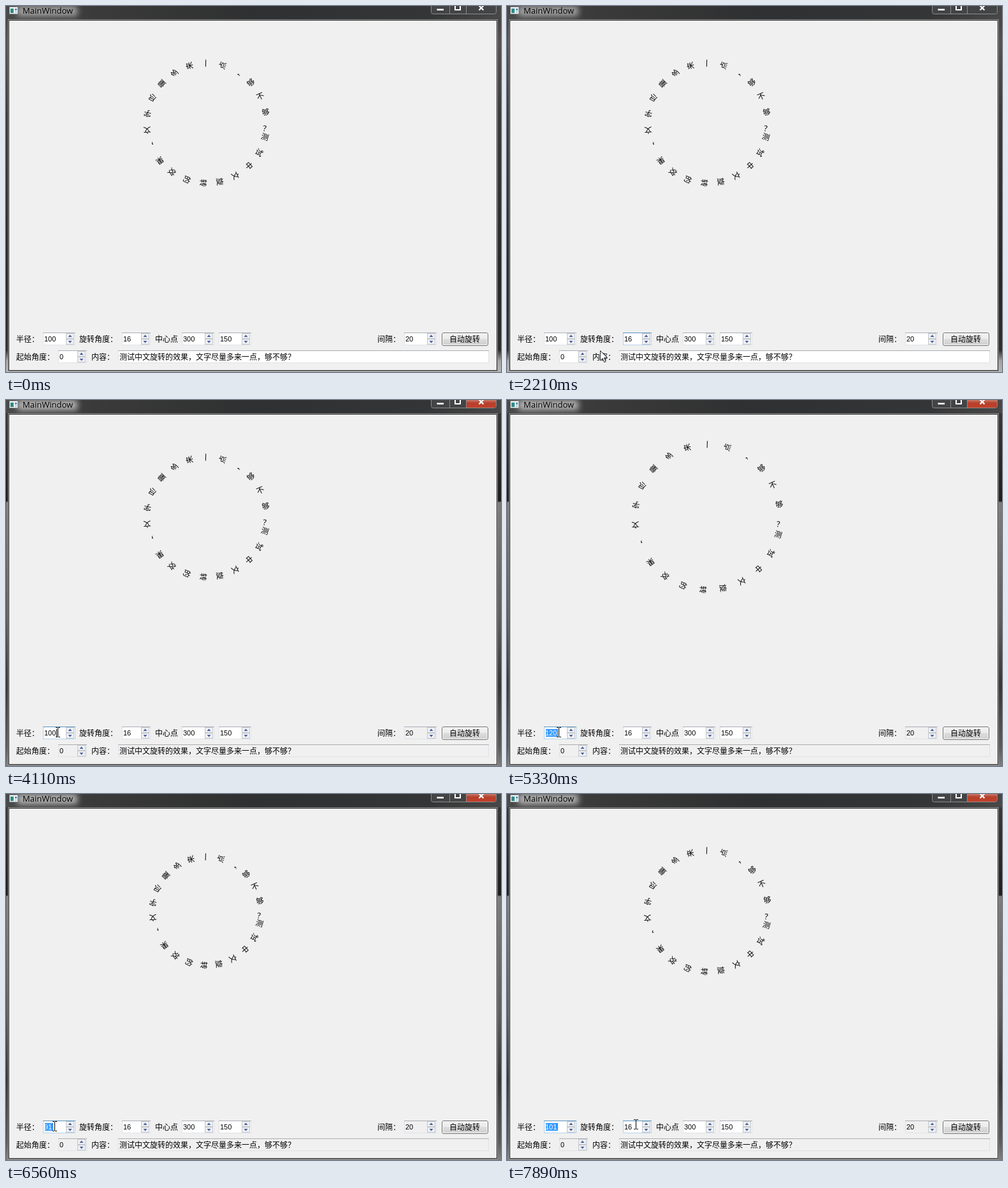
An HTML page for the animation above (8 s loop, 777 px wide and 575 px high).

```html
<!DOCTYPE html>
<html lang="zh-CN">
<head>
<meta charset="utf-8">
<title>MainWindow</title>
<style>
  html, body { margin: 0; width: 100%; height: 100%; overflow: hidden; background: #333; }
  svg { display: block; position: absolute; left: 0; top: 0; }
  text { font: 12px "Noto Sans CJK SC", "Noto Sans CJK", sans-serif; white-space: pre; }
  .num { font: 11px "Liberation Sans", Arial, sans-serif; }
  .title { font: 13px "Open Sans", sans-serif; }
  #ring text { font-weight: 300; }
  rect, line, .crisp { shape-rendering: crispEdges; }
  .soft { shape-rendering: auto; }
</style>
</head>
<body>
<svg id="stage" width="777" height="575" viewBox="0 0 777 575">
  <defs>
    <linearGradient id="bar" x2="1" y2="0">
      <stop offset="0" stop-color="#4a4a4a"/><stop offset=".18" stop-color="#3a3a3a"/>
      <stop offset=".5" stop-color="#2f3031"/><stop offset=".85" stop-color="#343536"/>
      <stop offset="1" stop-color="#484848"/>
    </linearGradient>
    <linearGradient id="sideIdle" x2="0" y2="1">
      <stop offset="0" stop-color="#3c3c3c"/><stop offset=".1" stop-color="#565050"/>
      <stop offset=".3" stop-color="#383838"/><stop offset=".75" stop-color="#242424"/>
      <stop offset=".94" stop-color="#2c2c2c"/><stop offset=".97" stop-color="#a4a4a4"/>
      <stop offset="1" stop-color="#b4b4b4"/>
    </linearGradient>
    <linearGradient id="sideActive" x2="0" y2="1">
      <stop offset="0" stop-color="#3a3a3a"/><stop offset=".276" stop-color="#1c1c1c"/>
      <stop offset=".28" stop-color="#7c7c7c"/><stop offset=".6" stop-color="#5c5c5c"/>
      <stop offset=".78" stop-color="#343434"/><stop offset=".95" stop-color="#5a5a5a"/>
      <stop offset="1" stop-color="#808080"/>
    </linearGradient>
    <linearGradient id="red" x2="0" y2="1">
      <stop offset="0" stop-color="#c8796c"/><stop offset=".4" stop-color="#b5402b"/>
      <stop offset="1" stop-color="#c4402a"/>
    </linearGradient>
    <linearGradient id="push" x2="0" y2="1">
      <stop offset="0" stop-color="#f2f2f2"/><stop offset=".5" stop-color="#ebebeb"/>
      <stop offset=".5" stop-color="#dddddd"/><stop offset="1" stop-color="#cfcfcf"/>
    </linearGradient>
    <filter id="blur" x="-30%" y="-100%" width="160%" height="300%"><feGaussianBlur stdDeviation="5"/></filter>
  </defs>
  <g id="frame"></g>
  <g id="form"></g>
  <g id="ring"></g>
  <g id="pointer"></g>
</svg>
<script>
const LOOP = 8000;
const MESSAGE = "测试中文旋转的效果，文字尽量多来一点，够不够？";
const CENTER = [315, 184], STEP = 16, GLYPH = 12;
const ACTIVE_AT = 4110, SELECT_AT = 4510;

// [time, radius]
const RADII = [[0, 100], [4510, 105], [4660, 108], [4780, 111], [5060, 116], [5330, 120],
  [5610, 118], [5730, 114], [6010, 106], [6160, 102], [6280, 98], [6560, 91],
  [6680, 90], [6980, 96], [7230, 98], [7350, 100], [7470, 101]];

// [time, shape, x, y]
const POINTER = [[0, "none", 0, 0], [1090, "arrow", 574, 538], [1240, "arrow", 542, 518],
  [1390, "arrow", 509, 463], [1540, "arrow", 494, 449], [1690, "arrow", 440, 448],
  [1970, "arrow", 330, 490], [2090, "arrow", 200, 527], [2210, "arrow", 146, 541],
  [2330, "arrow", 118, 546], [2450, "arrow", 114, 535], [2600, "arrow", 80, 520],
  [2750, "beam", 80, 523], [2900, "beam", 81, 522], [5610, "beam", 79, 522],
  [5730, "beam", 76, 522], [7620, "arrow", 112, 518], [7740, "arrow", 168, 518],
  [7890, "beam", 202, 519]];

// [time, highlighted spin box]
const HOVER = [[0, ""], [2090, "angle"], [2330, "start"], [2600, ""], [2750, "radius"], [7890, "radius angle"]];

const $ = id => document.getElementById(id);
const at = (table, t) => table.reduce((found, row) => row[0] <= t ? row : found);

function add(parent, tag, attrs, content) {
  const node = document.createElementNS("http://www.w3.org/2000/svg", tag);
  for (const key in attrs) node.setAttribute(key, attrs[key]);
  if (content !== undefined) node.textContent = content;
  parent.appendChild(node);
  return node;
}
const box = (parent, x, y, width, height, fill, more) =>
  add(parent, "rect", { x, y, width, height, fill, ...more });
const border = (parent, x, y, w, h, stroke, fill = "none", more) =>
  box(parent, x + .5, y + .5, w - 1, h - 1, fill, { stroke, ...more });
const label = (parent, x, y, words, cls = "", fill = "#000") =>
  add(parent, "text", { x, y, class: cls, fill }, words);

// Window frame
const frame = $("frame");
const sides = box(frame, 0, 0, 777, 575, "url(#sideIdle)");
box(frame, 0, 0, 777, 21, "url(#bar)");
const glow = box(frame, 18, 0, 94, 16, "#fff", { class: "soft", filter: "url(#blur)", opacity: .5 });
border(frame, 3, 21, 769, 553, "#9a9a9a");
border(frame, 4, 22, 767, 551, "#2a2a2a", "#f0f0f0");
border(frame, 5, 1, 14, 12, "#8a9298", "#f4f6f6");
box(frame, 7, 4, 5, 7, "#2f8d86");
box(frame, 14, 4, 3, 3, "#5a8fc0");
box(frame, 14, 8, 3, 3, "#c4cdd2");
label(frame, 26, 12, "MainWindow", "title");

const cap = (x, w, fill) => add(frame, "path", {
  d: `M${x + .5} -1V9.5q0 3 3 3h${w - 7}q3 0 3-3V-1`, fill, stroke: "#8c8c8c"
});
cap(667, 103, "#434445");
const closeFill = add(frame, "path", { d: "M723 0h46v9q0 3-3 3h-43z", fill: "url(#red)" });
[696, 722].forEach(x => box(frame, x, 0, 1, 12, "#8c8c8c"));
box(frame, 676, 4, 11, 3, "#fff", { stroke: "#444", "stroke-width": .5 });
add(frame, "path", { d: "M705 -1h8v7h-8z", fill: "none", stroke: "#fff", "stroke-width": 2, class: "crisp" });
add(frame, "path", { d: "M742.5 -.5l7 7m0-7l-7 7", stroke: "#fff", "stroke-width": 2.2 });

// Controls
const form = $("form");
const fields = {};

function field(name, x, y, w) {
  const back = border(form, x, y, w, 20, "#dfe2e8", "#fff");
  const top = box(form, x, y, w, 1, "#abadb3");
  fields[name] = { back, top };
}
function spin(name, x, y, w, value) {
  field(name, x, y, w);
  const bx = x + w - 15;
  [[y + 1, -1], [y + 10, 1]].forEach(([by, dir]) => {
    border(form, bx, by, 13, 9, "#c3c6cc", "#eef0f3");
    const tip = by + 4.5 + dir * 2;
    add(form, "path", { d: `M${bx + 3.5} ${tip - dir * 3.5}h6l-3 ${dir * 3.5}z`, fill: "#4a5f9c" });
  });
  fields[name].value = label(form, x + 2, y + 14, value, "num");
}

[[16, 528, "半径："], [115, 528, "旋转角度："], [234, 528, "中心点"], [583, 528, "间隔："],
 [16, 555.5, "起始角度："], [134, 555.5, "内容："]].forEach(([x, y, words]) => label(form, x, y, words));
spin("radius", 58, 513, 51, "");
spin("angle", 182, 513, 45, "16");
spin("centerX", 276, 513, 51, "300");
spin("centerY", 334, 513, 51, "150");
spin("interval", 625, 513, 51, "20");
spin("start", 82, 541, 45, "0");
field("content", 176, 541, 582);
label(form, 178, 555.5, MESSAGE);

border(form, 684, 513, 73, 21, "#707070", "url(#push)", { rx: 2.5, class: "soft" });
border(form, 685, 514, 71, 19, "#fafafa", "none", { rx: 1.5, class: "soft" });
label(form, 696, 528, "自动旋转");

const radiusText = fields.radius.value;
const selection = box(form, 61, 517, 18, 12, "#3399ff");
form.insertBefore(selection, radiusText);
const caret = box(form, 79, 517, 1, 12, "#000");

// Characters around the circle
const glyphs = [...MESSAGE].map((char, i) => {
  const spoke = add($("ring"), "g", { transform: `translate(${CENTER}) rotate(${STEP * (i + 1)})` });
  return label(spoke, 0, 0, char);
});

// Pointers, hot spot at the origin
const shapes = {
  arrow: add($("pointer"), "path", {
    d: "M.5 .5V16l3.6-3.4 2.6 6 2.4-1-2.6-5.8h5z", fill: "#fff", stroke: "#20242c"
  }),
  beam: add($("pointer"), "path", {
    d: "M-3 -7.5h3m1 0h3M.5 -7V7M-3 7.5h3m1 0h3", fill: "none", stroke: "#000", class: "crisp"
  })
};

function draw(t) {
  const active = t >= ACTIVE_AT, selected = t >= SELECT_AT;
  sides.setAttribute("fill", active ? "url(#sideActive)" : "url(#sideIdle)");
  glow.setAttribute("opacity", active ? .6 : .5);
  closeFill.style.display = active ? "" : "none";

  const hovered = at(HOVER, t)[1].split(" ");
  for (const name in fields) {
    const { back, top } = fields[name];
    const lit = hovered.includes(name);
    const dull = active && ["interval", "start", "content"].includes(name);
    back.setAttribute("fill", dull ? "#f0f0f0" : "#fff");
    back.setAttribute("stroke", lit ? "#b5d3ea" : "#dfe2e8");
    top.setAttribute("fill", lit ? "#5794bf" : "#abadb3");
  }

  const radius = at(RADII, t)[1];
  glyphs.forEach(g => g.setAttribute("x", radius - GLYPH));
  radiusText.textContent = radius;
  radiusText.setAttribute("fill", selected ? "#fff" : "#000");
  selection.setAttribute("width", String(radius).length * 6 + 1);
  selection.style.display = selected ? "" : "none";
  caret.style.display = active && !selected ? "" : "none";

  const [, shape, x, y] = at(POINTER, t);
  $("pointer").setAttribute("transform", `translate(${x} ${y})`);
  for (const name in shapes) shapes[name].style.display = name === shape ? "" : "none";
}

function tick() {
  draw(performance.now() % LOOP);
  requestAnimationFrame(tick);
}
tick();
</script>
</body>
</html>
```
